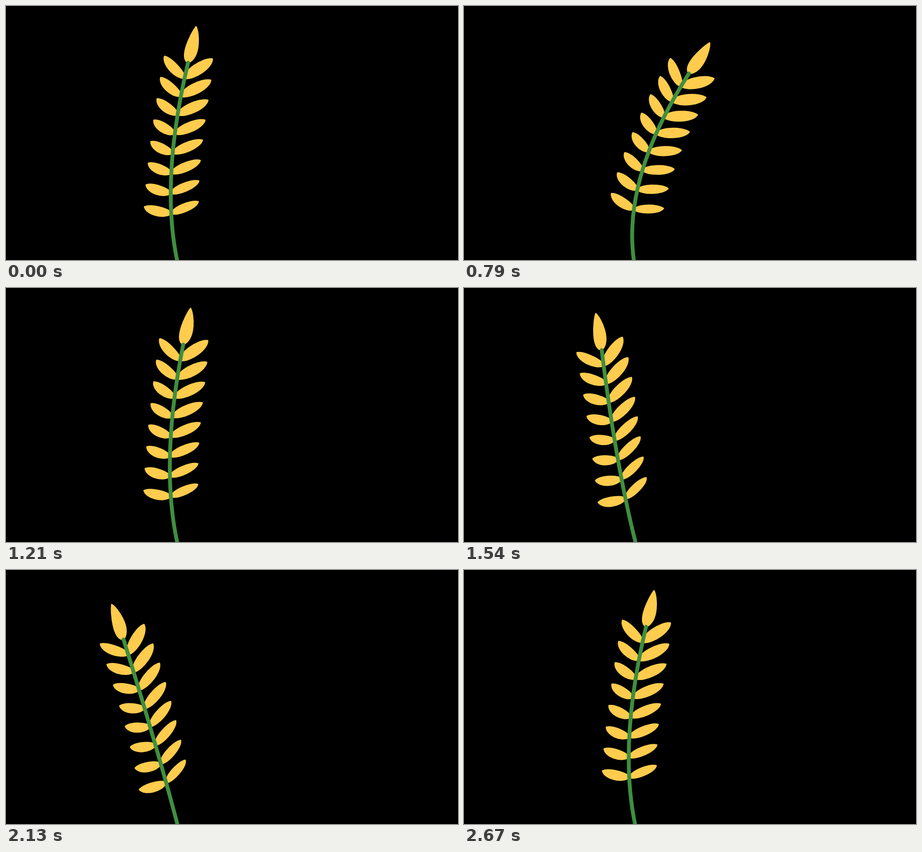
An HTML page with a canvas for the animation above (2.71 s loop, 998 px wide and 561 px high).

```html
<!DOCTYPE html>
<html lang="en">
<head>
<meta charset="utf-8">
<title>Swaying wheat</title>
<style>
  html, body { margin: 0; height: 100%; overflow: hidden; background: #000; }
  canvas { display: block; }
</style>
</head>
<body>
<canvas id="stage" width="998" height="561"></canvas>
<script>
const ctx = document.getElementById('stage').getContext('2d');
const LOOP = 2710, STEPS = 64, RIGHT_TURN = 14, PAIRS = 8;
const GRAIN = '#ffcc4d', STEM = '#3f8f3f';

// Leaves of pair i, counted from the top; farLeft is the turn at the left end of the sway
const stemPlace = i => .932 - .077 * i - .0025 * i * i;
const rightLeaf = i => ({
  side: 1, angle: 24 + 11 * .4 ** i, length: 76.5 - .2 * i * i,
  upper: 12.2 - .4 * i, lower: 12.8 - .5 * i, taper: 1, farLeft: 1.3 * i - 25
});
const leftLeaf = i => ({
  side: -1, angle: 48 - 4.8 * i, length: 56 + .7 * (i - 4) ** 2,
  upper: 8.5, lower: 13, taper: 1, farLeft: -22 - 1.2 * i
});
const tipLeaf = { side: 1, angle: 77.5, length: 82.9, upper: 12.5, lower: 14, taper: .55, farLeft: -47 };

// Linear interpolation through [step, value] keys
function track(keys, n) {
  const i = Math.max(1, keys.findIndex(k => k[0] >= n));
  const [a, va] = keys[i - 1], [b, vb] = keys[i];
  return va + (vb - va) * (n - a) / (b - a);
}

const turn = (n, farLeft) => track(
  [[0, 0], [17, 26], [29, -1], [39, -27], [46, farLeft], [52, -28], [64, 0]], n);
const slide = n => track([[0, 0], [9, -2], [19, 9], [29, -2.5], [56, -8], [64, 0]], n);

// Quadratic curve of the stem for a sway from -1 (left) to 1 (right)
function stemPoints(u) {
  return [
    [378 - 2.5 * u - 3 * u * u, 561],
    [339 + 12 * u + 6 * u * u, 384 - 10 * u],
    [380.5 + 172.5 * u - 5 * u * u, 124.9 - 3.3 * u + 55.7 * u * u]
  ];
}

function pointOn([a, b, c], t) {
  const s = 1 - t;
  return [0, 1].map(k => s * s * a[k] + 2 * s * t * b[k] + t * t * c[k]);
}

function drawLeaf([x, y], { side, angle, length, upper, lower, taper, farLeft }, n) {
  const len = length - 1.5, up = (1 - upper) / .75, low = (lower - 1) / .75;
  const swell = 2 - taper;
  ctx.save();
  ctx.translate(x, y);
  ctx.rotate((turn(n, farLeft) - side * angle) * Math.PI / 180);
  ctx.scale(side, 1);
  ctx.beginPath();
  ctx.moveTo(0, 0);
  ctx.bezierCurveTo(.08 * len, up * swell, .78 * len, up * taper, len, 0);
  ctx.bezierCurveTo(.86 * len, low * taper, .22 * len, low * swell, 0, 0);
  ctx.lineWidth = 3;
  ctx.fill();
  ctx.stroke();
  ctx.restore();
}

function drawStem([base, bend, tip]) {
  ctx.beginPath();
  ctx.moveTo(base[0] + (base[0] - bend[0]) * .1, base[1] + (base[1] - bend[1]) * .1);
  ctx.lineTo(...base);
  ctx.quadraticCurveTo(...bend, ...tip);
  ctx.lineWidth = 8.5;
  ctx.strokeStyle = STEM;
  ctx.stroke();
}

function draw() {
  // 24 steps per second, with start times rounded to 10 ms
  const t = performance.now() % LOOP;
  const n = Math.ceil((Math.floor(t / 10) + .5) * .24) - 1;
  const d = (n - RIGHT_TURN + STEPS) % STEPS;
  const stem = stemPoints(1 - Math.min(d, STEPS - d) / 16);

  ctx.fillStyle = '#000';
  ctx.fillRect(0, 0, 998, 561);
  ctx.fillStyle = ctx.strokeStyle = GRAIN;
  ctx.lineCap = ctx.lineJoin = 'round';
  for (let i = 0; i < PAIRS; i++) {
    const place = stemPlace(i);
    const node = pointOn(stem, place + slide(n) * Math.min(1, (1 - place) * 3) / 420);
    drawLeaf(node, rightLeaf(i), n);
    drawLeaf(node, leftLeaf(i), n);
  }
  drawLeaf(stem[2], tipLeaf, n);
  drawStem(stem);
  requestAnimationFrame(draw);
}
draw();
</script>
</body>
</html>
```
